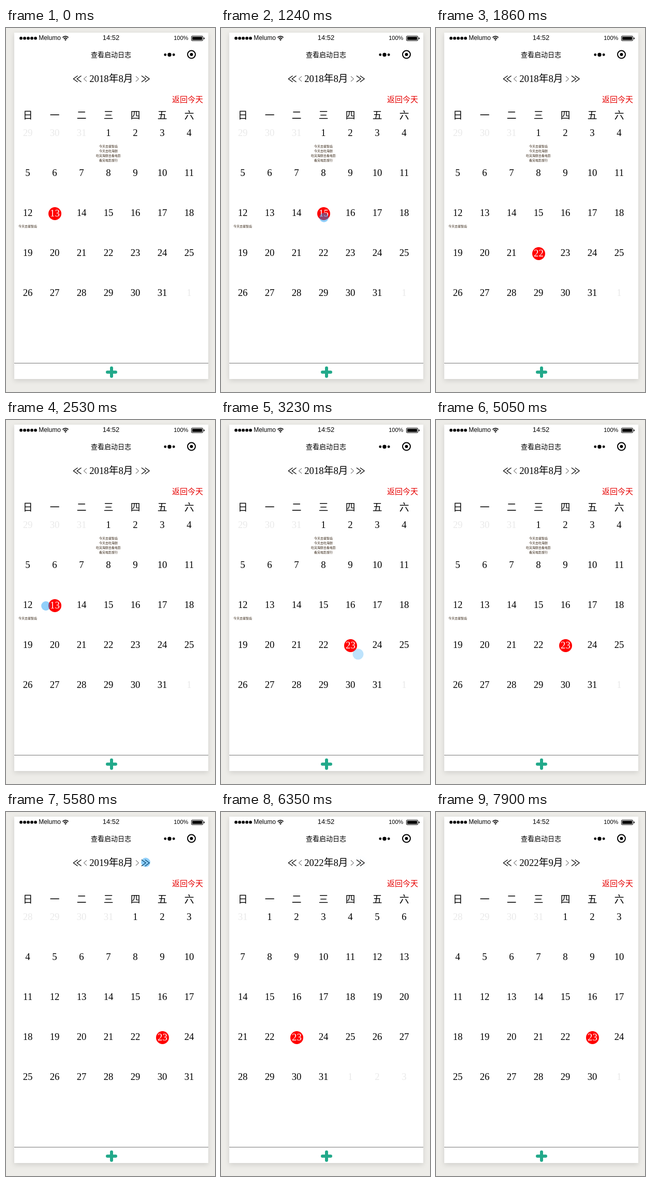
These frames come from a looping animation (404x701 px, 8000 ms). An HTML page:

```html
<!DOCTYPE html>
<html>
<head>
<meta charset="utf-8">
<style>
  html, body { margin: 0; width: 100%; height: 100%; overflow: hidden; background: #edece8; }
  svg { display: block; width: 404px; height: 701px; }
  .phone { filter: drop-shadow(0 3px 5px rgba(0, 0, 0, .12)); }
  text { text-anchor: middle; }
  .serif { font: 18.75px "Liberation Serif", "Noto Sans CJK SC", serif; }
  .sans { font-family: "Liberation Sans", "Noto Sans CJK SC", sans-serif; }
  .note { font: 6px "Noto Sans CJK SC", sans-serif; fill: #321; }
  .line { fill: none; stroke: #000; stroke-width: 1.2; }
  .thin { stroke: #444; stroke-width: 1; }
</style>
</head>
<body>
<svg viewBox="0 0 404 701">
  <rect class="phone" x="16" y="9" width="375" height="667" fill="#fff"/>

  <g class="sans">
    <g id="signal"></g>
    <text x="84.5" y="23" font-size="12">Melumo</text>
    <g fill="none" stroke="#000" stroke-width="1.8">
      <path d="M109.5 18.2Q115 13.6 120.500 18.2"/>
      <path d="M111.600 20.600Q115 17.800 118.400 20.600"/>
    </g>
    <path d="M112.900 22.200Q115 20.600 117.100 22.200L115 24.500Z"/>
    <text x="203" y="23" font-size="13">14:52</text>
    <text x="338.300" y="23" font-size="11">100%</text>
    <rect x="358.500" y="15.500" width="22" height="9" rx="1.500" fill="none" stroke="#000"/>
    <rect x="360" y="17" width="19" height="6"/>
    <path d="M382 18q2 .5 2 2t-2 2z"/>
    <text x="203" y="55.500" font-size="13">查看启动日志</text>
    <text x="351" y="143" font-size="15" fill="#e60000">返回今天</text>
  </g>

  <circle cx="307.800" cy="51.500" r="2.400"/>
  <circle cx="316" cy="51.500" r="3.700"/>
  <circle cx="324.200" cy="51.500" r="2.400"/>
  <circle cx="358.500" cy="51" r="7.500" fill="none" stroke="#000" stroke-width="2"/>
  <circle cx="358.500" cy="51" r="3"/>

  <path class="line" d="M138.500 92L130.300 98L138.500 104M145.500 92L137.300 98L145.500 104"/>
  <path class="line thin" d="M156 93L150.500 98L156 103M251 93L256.500 98L251 103"/>
  <path class="line" d="M262 92L270.200 98L262 104M269 92L277.200 98L269 104"/>

  <text class="serif" id="title" x="203.400" y="104"></text>
  <g class="serif" id="week"></g>
  <g class="serif" id="days"></g>
  <g id="notes"></g>

  <path d="M16 645.500H391" stroke="#777"/>
  <path d="M196 662.700H212M204 654.700V670.700" stroke="#22a98a" stroke-width="6" stroke-linecap="round"/>
  <g id="touches" fill="#0c96f5"></g>
</svg>
<script>
const LOOP = 8000, TAP_MS = 325;
const $ = id => document.getElementById(id);
const colX = i => 42 + 52 * i;
const rowY = i => 202 + 77 * i;

// start, x, y, state change, delay of the change
const taps = [
  [850, 146, 362, { d: 14 }, 30],
  [1200, 199, 365, { d: 15 }, 30],
  [1500, 199, 407, { d: 22 }, 30],
  [2000, 92, 461, { d: 20 }, 30],
  [2490, 77, 358, { d: 13 }, 30],
  [2785, 200, 328, { d: 15 }, 30],
  [3075, 265, 451, { d: 23 }, 30],
  [3960, 279, 95, {}, 0],
  [4640, 279, 95, {}, 0],
  [5060, 270, 97, { y: 2019 }, 90],
  [5540, 270, 97, { y: 2020 }, 90],
  [5785, 270, 97, { y: 2021 }, 90],
  [6030, 270, 97, { y: 2022 }, 90],
  [7570, 254, 97, { m: 9 }, 90]
];

const notes = {
  1: ['今天去拔智齿', '今天去吃海鲜', '吃完海鲜去看电影', '看完电影旅行'],
  12: ['今天去拔智齿']
};

const label = (x, y, s, attrs = '') => `<text x="${x}" y="${y}" ${attrs}>${s}</text>`;
const dot = (x, y, r, attrs = '') => `<circle cx="${x}" cy="${y}" r="${r}" ${attrs}/>`;

$('signal').innerHTML = [0, 1, 2, 3, 4].map(i => dot(29 + 7 * i, 19.7, 2.9)).join('');
$('week').innerHTML = [...'日一二三四五六'].map((c, i) => label(colX(i), 174.5, c)).join('');

function drawMonth({ y, m, d }) {
  $('title').textContent = `${y}年${m}月`;
  const lead = new Date(y, m - 1, 1).getDay();
  const count = new Date(y, m, 0).getDate();
  const cells = Math.ceil((lead + count) / 7) * 7;
  let days = '', memo = '';
  for (let i = 0; i < cells; i++) {
    const n = i - lead + 1, x = colX(i % 7), cy = rowY(Math.floor(i / 7));
    if (n < 1 || n > count) {
      days += label(x, cy + 6, new Date(y, m - 1, n).getDate(), 'fill="#e9e9e9"');
    } else if (n === d) {
      days += dot(x + .5, cy + 1.5, 12.5, 'fill="#f00"') + label(x + .4, cy + 7, n, 'fill="#fff"');
    } else {
      days += label(x, cy + 6, n);
    }
    if (y === 2018 && m === 8 && notes[n]) {
      memo += notes[n].map((s, k) => label(x, cy + 28.2 + 9 * k, s, 'class="note"')).join('');
    }
  }
  $('days').innerHTML = days;
  $('notes').innerHTML = memo;
}

let shown = '';
function frame(now) {
  const t = now % LOOP;
  const state = { y: 2018, m: 8, d: 13 };
  let circles = '';
  for (const [start, x, y, change, delay] of taps) {
    if (t >= start + delay) Object.assign(state, change);
    const p = (t - start) / TAP_MS;
    if (p >= 0 && p < 1) circles += dot(x, y, 8.3 + 4.7 * p, `opacity="${.52 * (1 - p)}"`);
  }
  const key = Object.values(state).join();
  if (key !== shown) drawMonth(state);
  shown = key;
  $('touches').innerHTML = circles;
  requestAnimationFrame(() => frame(performance.now()));
}
frame(performance.now());
</script>
</body>
</html>
```
